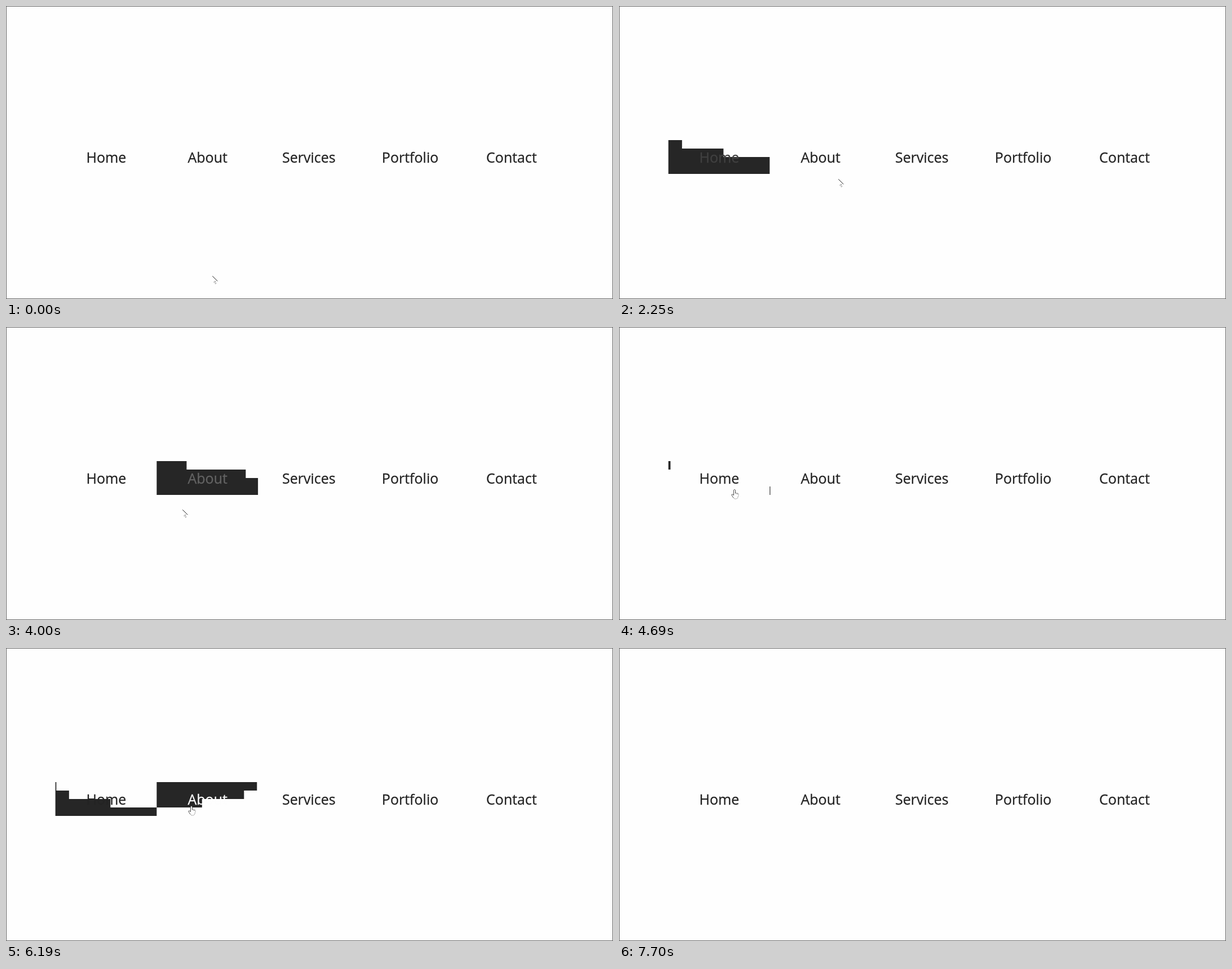
An HTML page for the animation above (8200 ms loop, 1077x520 px).

```html
<!DOCTYPE html>
<html lang="en">
<head>
<meta charset="utf-8">
<title>Menu hover</title>
<style>
  html, body { margin: 0; width: 100%; height: 100%; overflow: hidden; background: #fefefe; }
  svg { display: block; width: 1077px; height: 520px; }
  .bar { fill: #262626; }
  .frame { fill: none; stroke: #666; }
  text { font: 25px "Open Sans", "Noto Sans", sans-serif; text-anchor: middle; stroke-width: .3; }
  .line { fill: none; stroke: #222; }
  .thin { fill: none; stroke: #555; stroke-width: .8; stroke-dasharray: 1.5 1; }
  .skin { fill: #fff; }
</style>
</head>
<body>
<svg viewBox="0 0 1077 520">
  <g id="menu"></g>
  <rect class="frame" x=".5" y=".5" width="1076" height="519"/>
  <g id="arrow">
    <path class="skin" d="M0 0V14L3 11L5.5 16L8 15L6 10.5H10Z"/>
    <path class="line" d="M.3 .3L9.3 9.3"/>
    <path class="thin" d="M2.5 11.5L4 9.5H7M4 11L5.5 14.2L7 13.5L5.5 10.5"/>
  </g>
  <g id="hand">
    <path class="skin" d="M-1.5 1.5Q0 -.8 1.5 1.5V6L6 7.2Q7.4 7.6 7 10.5L5.5 15.5Q4 17.3 .5 17L-2 15.2L-5 10.5Q-5.5 8.5 -3.4 9L-1.5 10.5Z"/>
    <path class="line" stroke-width=".8" d="M-1.5 10.5V1.5Q0 -.8 1.5 1.5V7.5M-1.5 10.5L-3.4 9Q-5.5 8.5 -5 10.5L-2 15.2"/>
    <path class="thin" d="M1.5 6L6 7.2Q7.4 7.6 7 10.5L5.5 15.5Q4 17.3 .5 17L-2 15.2M3.6 7V9.5M5.4 7.5V9.8"/>
  </g>
</svg>
<script>
const LOOP = 8200, FADE = 500, STAGGER = 150, EXIT = 7200;
const LEFT = 87.6, CELL = 179.75, TOP = 238, ROW = 15;
const labels = ["Home", "About", "Services", "Portfolio", "Contact"];

// [cell, pointer enters, pointer leaves]
const hovers = [[0, 905, 1965], [1, 2773, 3793], [0, 4673, 5755], [1, 5757, 6748]];

// where the pointer turns: [time, x, y]
const turns = [[0, 366, 479], [900, 197, 294], [1770, 235, 284], [2250, 389, 307.5],
  [3340, 397, 290], [4250, 282, 337], [4690, 204.5, 288], [5740, 263, 268],
  [6700, 404, 294], [6950, 520, 418], [EXIT, 952, 515]];

const svgNS = "http://www.w3.org/2000/svg";
const get = id => document.getElementById(id);
const make = (name, attrs) => {
  const el = get("menu").appendChild(document.createElementNS(svgNS, name));
  for (const key in attrs) el.setAttribute(key, attrs[key]);
  return el;
};

const items = labels.map((label, i) => {
  const x = LEFT + CELL * i;
  const bars = [0, 1, 2, 3].map(row =>
    make("rect", { class: "bar", x, y: TOP + ROW * row, width: 0, height: ROW }));
  const text = make("text", { x: x + CELL / 2 + .4, y: 278 });
  text.textContent = label;
  return { bars, text };
});

const bez = (a, b, s) => 3 * a * s * (1 - s) ** 2 + 3 * b * s * s * (1 - s) + s ** 3;

// the CSS "ease" curve: cubic-bezier(.25, .1, .25, 1)
function ease(u) {
  if (u <= 0) return 0;
  if (u >= 1) return 1;
  let lo = 0, hi = 1;
  for (let i = 0; i < 24; i++) {
    const mid = (lo + hi) / 2;
    if (bez(.25, .25, mid) < u) lo = mid; else hi = mid;
  }
  return bez(.1, 1, lo);
}

function progress(cell, t) {
  let sum = 0;
  for (const [c, on, off] of hovers)
    if (c === cell) sum += ease((t - on) / FADE) - ease((t - off) / FADE);
  return sum;
}

function pointer(t) {
  const i = Math.max(1, turns.findIndex(turn => turn[0] >= t));
  const [t0, x0, y0] = turns[i - 1], [t1, x1, y1] = turns[i];
  const k = (t - t0) / (t1 - t0);
  return [x0 + (x1 - x0) * k, y0 + (y1 - y0) * k];
}

function draw(t) {
  items.forEach(({ bars, text }, i) => {
    bars.forEach((bar, row) =>
      bar.setAttribute("width", CELL * progress(i, t - row * STAGGER)));
    const c = Math.round(34 + 221 * progress(i, t));
    const color = `rgb(${c},${c},${c})`;
    text.setAttribute("fill", color);
    text.setAttribute("stroke", color);
  });
  const [x, y] = pointer(Math.min(t, EXIT));
  const over = hovers.some(([, on, off]) => t >= on && t < off);
  for (const id of ["arrow", "hand"]) {
    const shown = t < EXIT && over === (id === "hand");
    get(id).setAttribute("transform", `translate(${Math.round(x)} ${Math.round(y)})`);
    get(id).setAttribute("visibility", shown ? "visible" : "hidden");
  }
}

const begin = performance.now();
function loop() {
  draw((performance.now() - begin) % LOOP);
  requestAnimationFrame(loop);
}
loop();
</script>
</body>
</html>
```
